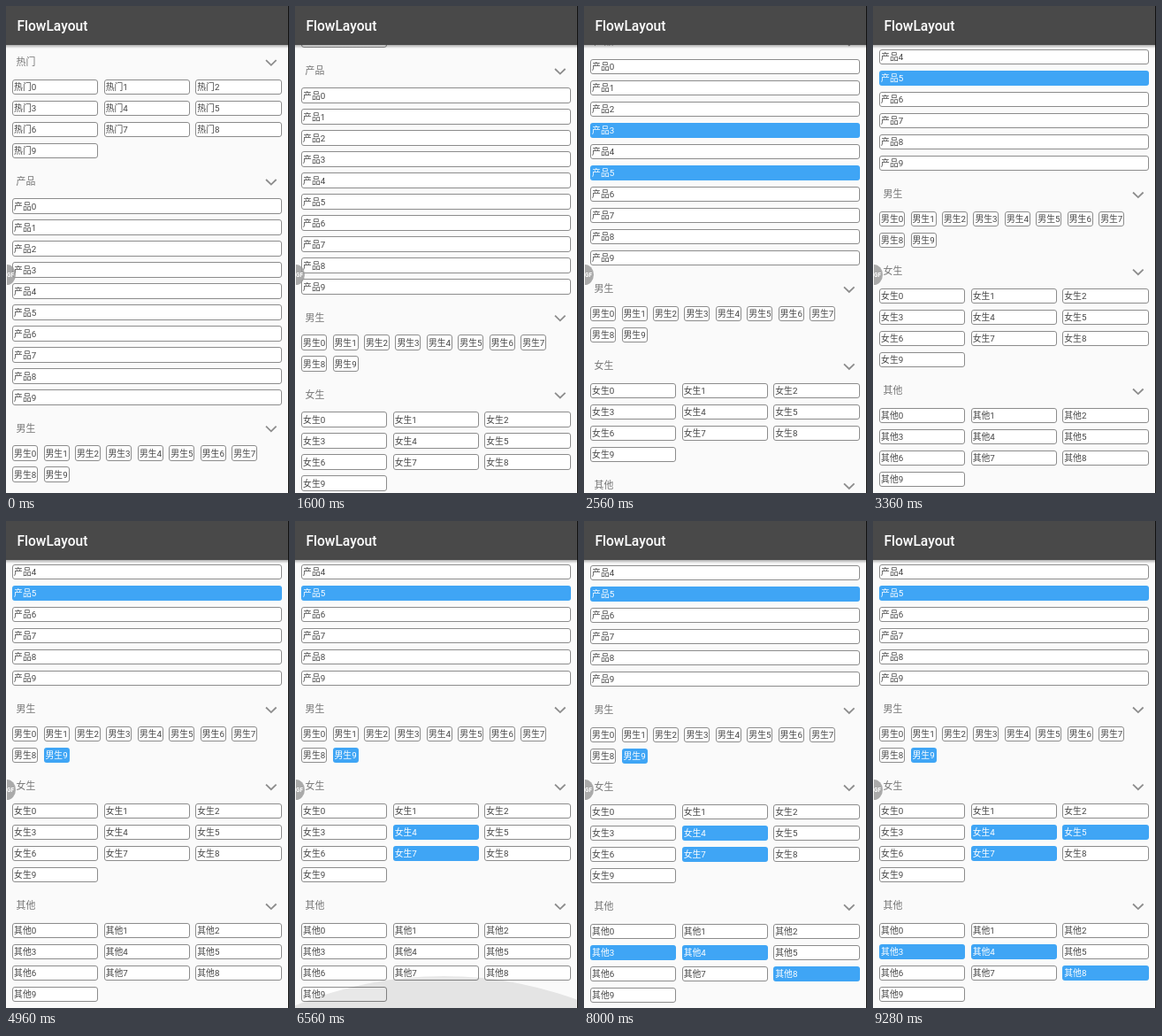
Animation of 320 by 550 pixels, one loop 9600 ms. Source, as an HTML page with a canvas:

```html
<!DOCTYPE html>
<html lang="zh-CN">
<head>
<meta charset="utf-8">
<title>FlowLayout</title>
<style>
  html, body { margin: 0; width: 100%; height: 100%; overflow: hidden; background: #fafafa; }
  canvas { display: block; }
</style>
</head>
<body>
<canvas id="stage" width="320" height="550"></canvas>
<script>
const ctx = document.getElementById('stage').getContext('2d');
const LOOP = 9600, W = 320, H = 550, BAR = 44;
const FONT = 'Roboto, "Noto Sans CJK SC", "Noto Sans CJK", sans-serif';
const LEFT = 7.1, ROW = 24, CHIP_H = 17.2;

// header: centre of the section title; top: first chip row
const sections = [
  { name: '热门', header: 63, top: 82.7, cols: 3, pitch: 103.6, width: 97.3 },
  { name: '产品', header: 197.8, top: 217.4, cols: 1, pitch: 0, width: 305 },
  { name: '男生', header: 476.5, top: 496.4, cols: 8, pitch: 35.45, width: 29 },
  { name: '女生', header: 563.6, top: 583.4, cols: 3, pitch: 103.6, width: 97.3 },
  { name: '其他', header: 698.5, top: 718.4, cols: 3, pitch: 103.6, width: 97.3 }
];

// [time, scroll offset]
const scrollSteps = [
  [0, 0], [1600, 125], [1760, 146], [1920, 154], [2080, 157.4],
  [3200, 215], [3360, 264.2], [8000, 263.3], [8160, 264.2]
];

// [from, to, chip]
const picks = [
  [640, 960, '热门1'], [960, LOOP, '热门4'],
  [2560, LOOP, '产品3'], [2560, LOOP, '产品5'],
  [4160, 4480, '男生4'], [4480, 4960, '男生7'], [4960, LOOP, '男生9'],
  [5280, LOOP, '女生4'], [5760, LOOP, '女生7'],
  [6880, LOOP, '其他3'], [7200, LOOP, '其他4'], [7520, LOOP, '其他8'],
  [8640, LOOP, '女生5']
];

// [time, height, opacity] of the overscroll glow
const glowSteps = [[0, 0, 0], [6560, 36, 0.09], [6720, 22, 0.05], [6880, 0, 0]];

const stepAt = (steps, t) => steps.filter(s => s[0] <= t).pop();

function text(str, x, y, size, color, weight = 400) {
  ctx.font = `${weight} ${size}px ${FONT}`;
  ctx.fillStyle = color;
  ctx.fillText(str, x, y);
}

// All four edges snap to whole pixels.
function drawChip(label, x, y, width, selected) {
  const left = Math.round(x), right = Math.round(x + width);
  const top = Math.round(y), bottom = Math.round(y + CHIP_H);
  ctx.beginPath();
  if (selected) {
    ctx.roundRect(left, top, right - left, bottom - top, 3);
    ctx.fillStyle = '#3fa5f5';
    ctx.fill();
  } else {
    ctx.roundRect(left + 0.5, top + 0.5, right - left - 1, bottom - top - 1, 2.5);
    ctx.fillStyle = '#fff';
    ctx.fill();
    ctx.strokeStyle = '#8c8c8c';
    ctx.lineWidth = 1;
    ctx.stroke();
  }
  text(label, x + 2, bottom - 5, 9.8, selected ? '#fff' : '#444');
}

function drawHeader(name, y) {
  text(name, 11.5, Math.round(y) + 4, 10.9, '#757575');
  ctx.beginPath();
  ctx.moveTo(294, y - 1.8);
  ctx.lineTo(299.8, y + 3.8);
  ctx.lineTo(305.6, y - 1.8);
  ctx.strokeStyle = '#8c8c8c';
  ctx.lineWidth = 1.8;
  ctx.stroke();
}

function drawSection(s, scroll, selected) {
  drawHeader(s.name, s.header - scroll);
  for (let i = 0; i < 10; i++) {
    const x = LEFT + (i % s.cols) * s.pitch;
    const y = s.top + Math.floor(i / s.cols) * ROW - scroll;
    const label = s.name + i;
    drawChip(label, x, y, s.width, selected.has(label));
  }
}

function drawGlow(height, opacity) {
  if (!height) return;
  const r = 441;
  ctx.beginPath();
  ctx.arc(168, H - height + r, r, 0, Math.PI * 2);
  ctx.fillStyle = `rgba(0,0,0,${opacity})`;
  ctx.fill();
}

function drawBar() {
  const shadow = ctx.createLinearGradient(0, BAR, 0, BAR + 4);
  shadow.addColorStop(0, 'rgba(0,0,0,0.3)');
  shadow.addColorStop(1, 'rgba(0,0,0,0)');
  ctx.fillStyle = shadow;
  ctx.fillRect(0, BAR, W, 4);
  ctx.fillStyle = '#494949';
  ctx.fillRect(0, 0, W, BAR);
  text('FlowLayout', 12.4, 28, 15.6, '#fff', 500);
}

function drawSideButton() {
  ctx.beginPath();
  ctx.ellipse(1, 303.5, 10, 11.5, 0, -Math.PI / 2, Math.PI / 2);
  ctx.fillStyle = 'rgba(150,150,150,0.8)';
  ctx.fill();
  text('GF', 1, 306, 6.5, '#fff', 700);
}

function draw(t) {
  const scroll = stepAt(scrollSteps, t)[1];
  const selected = new Set(picks.filter(p => t >= p[0] && t < p[1]).map(p => p[2]));
  const [, height, opacity] = stepAt(glowSteps, t);
  ctx.fillStyle = '#fafafa';
  ctx.fillRect(0, 0, W, H);
  sections.forEach(s => drawSection(s, scroll, selected));
  drawGlow(height, opacity);
  drawBar();
  drawSideButton();
  ctx.fillStyle = '#111';
  ctx.fillRect(319, 0, 1, H);
}

const start = performance.now();
function tick() {
  draw((performance.now() - start) % LOOP);
  requestAnimationFrame(tick);
}
tick();
</script>
</body>
</html>
```
